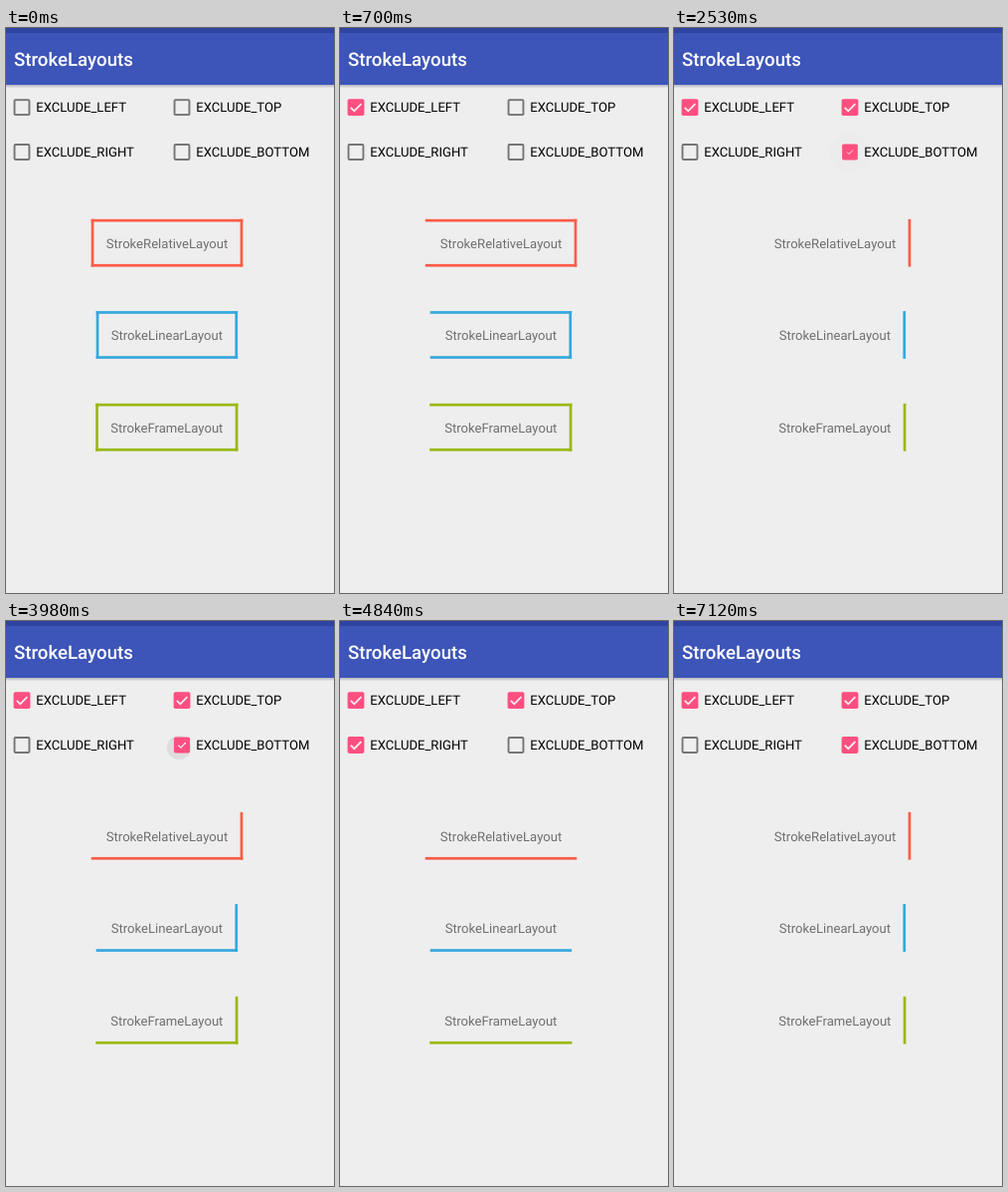
Recreate the animation shown at these times as an HTML page. Size 330 by 567 pixels, loop 8 s.

```html
<!DOCTYPE html>
<html lang="en">
<head>
<meta charset="utf-8">
<title>StrokeLayouts</title>
<style>
  html, body { margin: 0; width: 100%; height: 100%; overflow: hidden; background: #eee; }
  svg { display: block; width: 330px; height: 567px; font: 13.1px Roboto, sans-serif; text-rendering: geometricPrecision; }
  .title { font-size: 18.7px; font-weight: 500; fill: #fff; }
  .name { fill: #6f6f6f; text-anchor: middle; }
  .tick { fill: none; stroke: #f4f0f1; stroke-width: 1.8; }
</style>
</head>
<body>
<svg viewBox="0 0 330 567">
  <defs>
    <linearGradient id="shadow" x2="0" y2="1">
      <stop offset="0" stop-color="#b4b6be"/>
      <stop offset="1" stop-color="#eee"/>
    </linearGradient>
  </defs>
  <rect width="330" height="567" fill="#eee"/>
  <rect y="57" width="330" height="3.5" fill="url(#shadow)"/>
  <rect width="330" height="57" fill="#3d54b8"/>
  <rect width="330" height="5" fill="#2f43a0"/>
  <text class="title" x="8" y="38.4">StrokeLayouts</text>
</svg>
<script>
const LOOP = 8000;
const GREY = [117, 117, 117], PINK = [255, 79, 129];
const svg = document.querySelector('svg');

const boxes = [
  { side: 'left', x: 16, y: 79.6 },
  { side: 'top', x: 177, y: 79.6 },
  { side: 'right', x: 16, y: 124.5 },
  { side: 'bottom', x: 177, y: 124.5 }
];
const layouts = [
  { name: 'StrokeRelativeLayout', color: '#fb5c48', x: 85.7, y: 191.8, w: 152.6 },
  { name: 'StrokeLinearLayout', color: '#35a8de', x: 90.7, y: 284.1, w: 142.4 },
  { name: 'StrokeFrameLayout', color: '#9ab80e', x: 90.2, y: 376.8, w: 143.2 }
];
// Taps toggle a side: time in ms, side
const taps = [
  [500, 'left'], [1340, 'top'], [2380, 'bottom'], [3980, 'bottom'],
  [4610, 'right'], [5650, 'bottom'], [6950, 'right']
];

const clamp = v => Math.min(1, Math.max(0, v));

function set(node, attrs) {
  for (const key in attrs) node.setAttribute(key, attrs[key]);
  return node;
}

function add(parent, tag, attrs, text = '') {
  const node = set(document.createElementNS(svg.namespaceURI, tag), attrs);
  node.textContent = text;
  return parent.appendChild(node);
}

const lines = { left: [], top: [], right: [], bottom: [] };
const HEIGHT = 47.8, STROKE = 2.7;
for (const { name, color, x, y, w } of layouts) {
  const line = (side, lx, ly, width, height) =>
    lines[side].push(add(svg, 'rect', { x: lx, y: ly, width, height, fill: color }));
  line('left', x, y, STROKE, HEIGHT);
  line('top', x, y, w, STROKE);
  line('right', x + w - STROKE, y, STROKE, HEIGHT);
  line('bottom', x, y + HEIGHT - STROKE, w, STROKE);
  add(svg, 'text', { class: 'name', x: x + w / 2, y: y + 29 }, name);
}

for (const box of boxes) {
  const { side, x, y } = box;
  const group = add(svg, 'g', { transform: `translate(${x} ${y})` });
  box.ripple = add(group, 'circle', {});
  box.body = add(group, 'g', {});
  box.frame = add(box.body, 'rect', { x: -8.4, y: -8.4, width: 16.8, height: 16.8, rx: 1.8 });
  box.hole = add(box.body, 'rect', { fill: '#eee' });
  box.tick = add(box.body, 'path', { class: 'tick', d: 'M-5.2 .2L-1.7 3.7L5.4 -3.5' });
  add(svg, 'text', { x: x + 14.2, y: y + 4.8 }, 'EXCLUDE_' + side.toUpperCase());
}

function drawBox(box, on, since) {
  const progress = on ? clamp((since + 30) / 230) : 1 - clamp((since + 25) / 195);
  const fill = clamp(progress * 2);
  const tickScale = clamp(progress * 2 - 1);
  const hole = 6.5 * (1 - fill);
  const color = GREY.map((c, i) => Math.round(c + (PINK[i] - c) * fill));

  set(box.body, { transform: `scale(${1 - 0.1 * Math.sin(Math.PI * progress)})` });
  set(box.frame, { fill: `rgb(${color})` });
  set(box.hole, { x: -hole, y: -hole, width: 2 * hole, height: 2 * hole });
  set(box.tick, { transform: `scale(${tickScale})`, opacity: tickScale > 0 ? 1 : 0 });

  const spread = clamp(since / 170), rest = 1 - spread;
  set(box.ripple, { cx: -3 * rest, cy: 2.5 * rest, r: 12 + 9 * spread, opacity: 0.07 * rest });
}

function draw(time) {
  for (const box of boxes) {
    const past = taps.filter(([at, side]) => side === box.side && at <= time);
    const on = past.length % 2 === 1;
    const since = past.length ? time - past[past.length - 1][0] : Infinity;
    drawBox(box, on, since);
    for (const line of lines[box.side]) set(line, { visibility: on ? 'hidden' : 'visible' });
  }
}

const start = performance.now();
function tick() {
  draw((performance.now() - start) % LOOP);
  requestAnimationFrame(tick);
}
tick();
</script>
</body>
</html>
```
